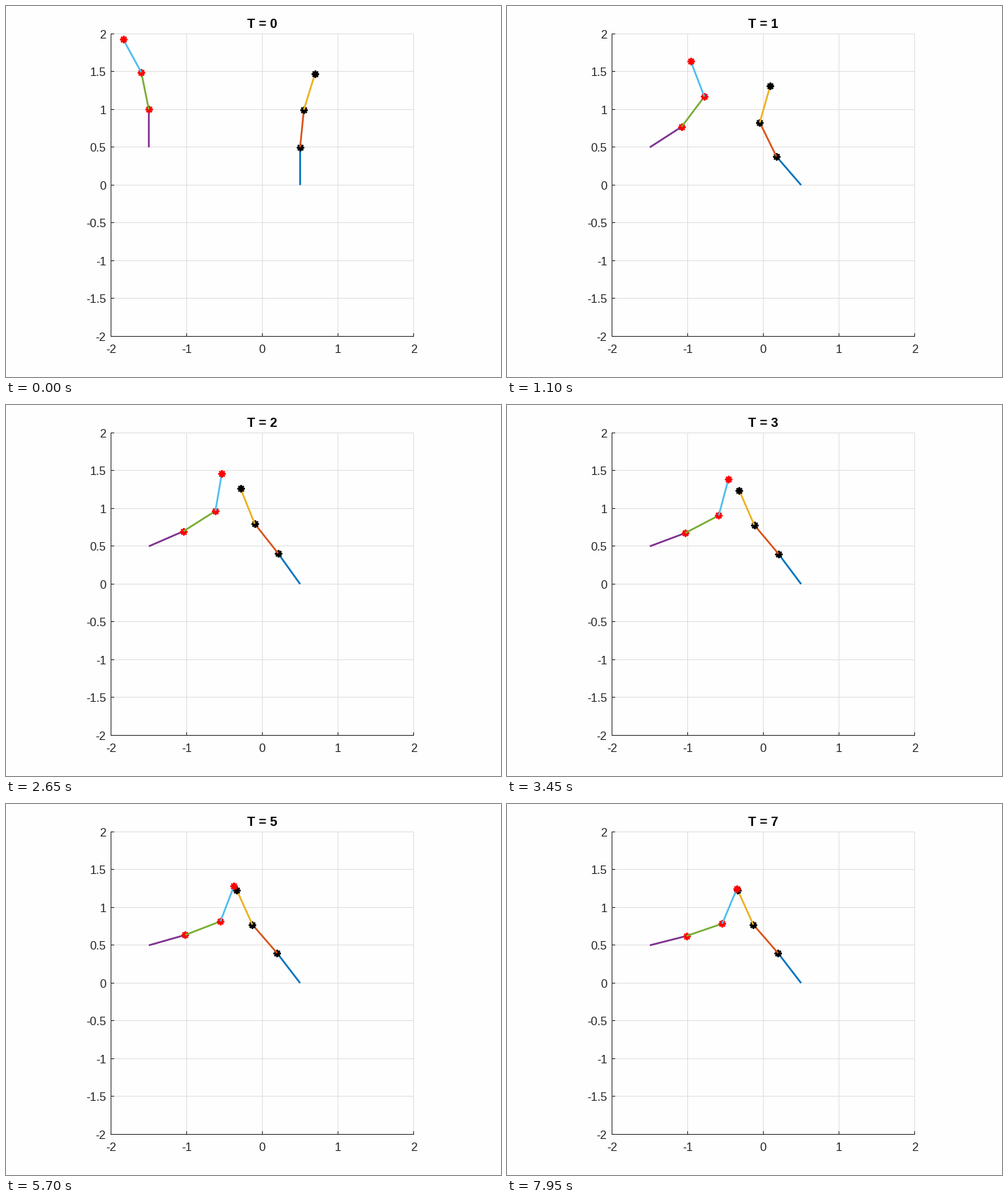
Animation, 700 px wide and 525 px high, one loop 8 s. Source, as a matplotlib script:

```python
import numpy as np
import matplotlib.pyplot as plt
from matplotlib.animation import FuncAnimation

W, H, DPI = 700, 525, 100
STEP_MS, FRAMES = 50, 160
PT = 72 / DPI                       # points per pixel
UNIT, LEFT, TOP = 106.97, 148.5, 39.5
INK, GRID = "#262626", "#dfdfdf"

LINK = 0.5                          # link length
GAIN = 0.5                          # how eagerly the left hand chases the right
SUBSTEPS = 10
RIGHT_BASE, LEFT_BASE = np.array([0.5, 0.0]), np.array([-1.5, 0.5])

# Link headings of the right arm in degrees: swing over, then settle.
SWING_T = [0, 0.55, 1.1, 1.7]
SWING = [[90, 84.3, 72.8], [141, 116.5, 51], [130.8, 116.1, 74.1],
         [121.1, 122.2, 106.4]]
REST = np.array([127.5, 131, 114.3])
SETTLE_RATE = 1.25
swing_fit = np.polyfit(SWING_T, SWING, 3)


def px(x):
    return LEFT + UNIT * (x + 2)


def py(y):
    return TOP + UNIT * (2 - y)


def chain(base, headings):
    """Points of an arm from its base to its hand."""
    steps = LINK * np.column_stack([np.cos(headings), np.sin(headings)])
    return np.vstack([base, base + np.cumsum(steps, axis=0)])


def right_arm(t):
    if t < SWING_T[-1]:
        deg = swing_fit.T @ t ** np.arange(3, -1, -1)
    else:
        left = np.exp(-SETTLE_RATE * (t - SWING_T[-1]))
        deg = REST + (np.array(SWING[-1]) - REST) * left
    return chain(RIGHT_BASE, np.radians(deg))


def chase():
    """Left arm: its hand follows the right hand by pseudo-inverse control."""
    joints = np.array([np.pi / 2, 0.2, 0.3])
    dt = STEP_MS / 1000 / SUBSTEPS
    poses = []
    for i in range(FRAMES * SUBSTEPS):
        pts = chain(LEFT_BASE, np.cumsum(joints))
        if i % SUBSTEPS == 0:
            poses.append(pts)
        reach = pts[-1] - pts[:-1]
        jac = np.array([-reach[:, 1], reach[:, 0]])
        error = right_arm(i * dt)[-1] - pts[-1]
        joints = joints + np.linalg.pinv(jac) @ error * GAIN * dt
    return poses


left_poses = chase()

plt.rcParams["font.family"] = "Liberation Sans"
fig = plt.figure(figsize=(W / DPI, H / DPI), dpi=DPI, facecolor="#fefefe")
ax = fig.add_axes([0, 0, 1, 1])
ax.set_xlim(0, W)
ax.set_ylim(H, 0)
ax.axis("off")


def rule(xs, ys, color):
    ax.plot(xs, ys, color=color, lw=PT, solid_capstyle="butt", snap=False,
            zorder=1)


def label(x, y, text, align):
    ax.text(x, y, text, size=16.67 * PT, color=INK, ha=align, va="baseline")


def pixel(v):
    return np.floor(v) + 0.5


x0, x1 = pixel(px(-2)), pixel(px(2))
y0, y1 = pixel(py(-2)), pixel(py(2))
xticks, yticks = np.arange(-2, 3), np.arange(-2, 2.5, 0.5)

for v in xticks:
    rule([pixel(px(v))] * 2, [y0, y1], GRID)
for v in yticks:
    rule([x0, x1], [pixel(py(v))] * 2, GRID)
rule([x0, x0], [y0 + 0.5, y1 - 0.5], INK)
rule([x0 - 0.5, x1 + 0.5], [y0, y0], INK)
for v in xticks:
    rule([pixel(px(v))] * 2, [y0, y0 - 4.5], INK)
    label(px(v), 491, f"{v:g}", "center")
for v in yticks:
    rule([x0, x0 + 4.5], [pixel(py(v))] * 2, INK)
    label(141.5, py(v) + 6.5, f"{v:g}", "right")

title = ax.text(362.5, 31, "T = 0", size=18.33 * PT, weight="bold",
                color="black", ha="center", va="baseline")


def make_arm(colors, joint_color, z):
    parts = []
    for i, c in enumerate(colors):
        link, = ax.plot([], [], color=c, lw=2.5 * PT, solid_capstyle="butt",
                        snap=False, zorder=z + 2 * i)
        joint, = ax.plot([], [], ls="", marker=(8, 2, 0), ms=10 * PT,
                         mec=joint_color, mew=2.1 * PT, zorder=z + 2 * i + 1)
        parts.append((link, joint))
    return parts


def pose(arm, pts):
    xs, ys = px(pts[:, 0]), py(pts[:, 1])
    for i, (link, joint) in enumerate(arm):
        link.set_data(xs[i:i + 2], ys[i:i + 2])
        joint.set_data(xs[i + 1:i + 2], ys[i + 1:i + 2])


right = make_arm(["#0072bd", "#d95319", "#edb120"], "black", 5)
left = make_arm(["#7e2f8e", "#77ac30", "#4dbeee"], "red", 15)


def draw(n):
    ms = n * STEP_MS
    title.set_text(f"T = {ms // 1000}")
    pose(right, right_arm(ms / 1000))
    pose(left, left_poses[n])
    return []


anim = FuncAnimation(fig, draw, frames=FRAMES, interval=STEP_MS,
                     repeat=True, repeat_delay=0, blit=False)
plt.show()
```
